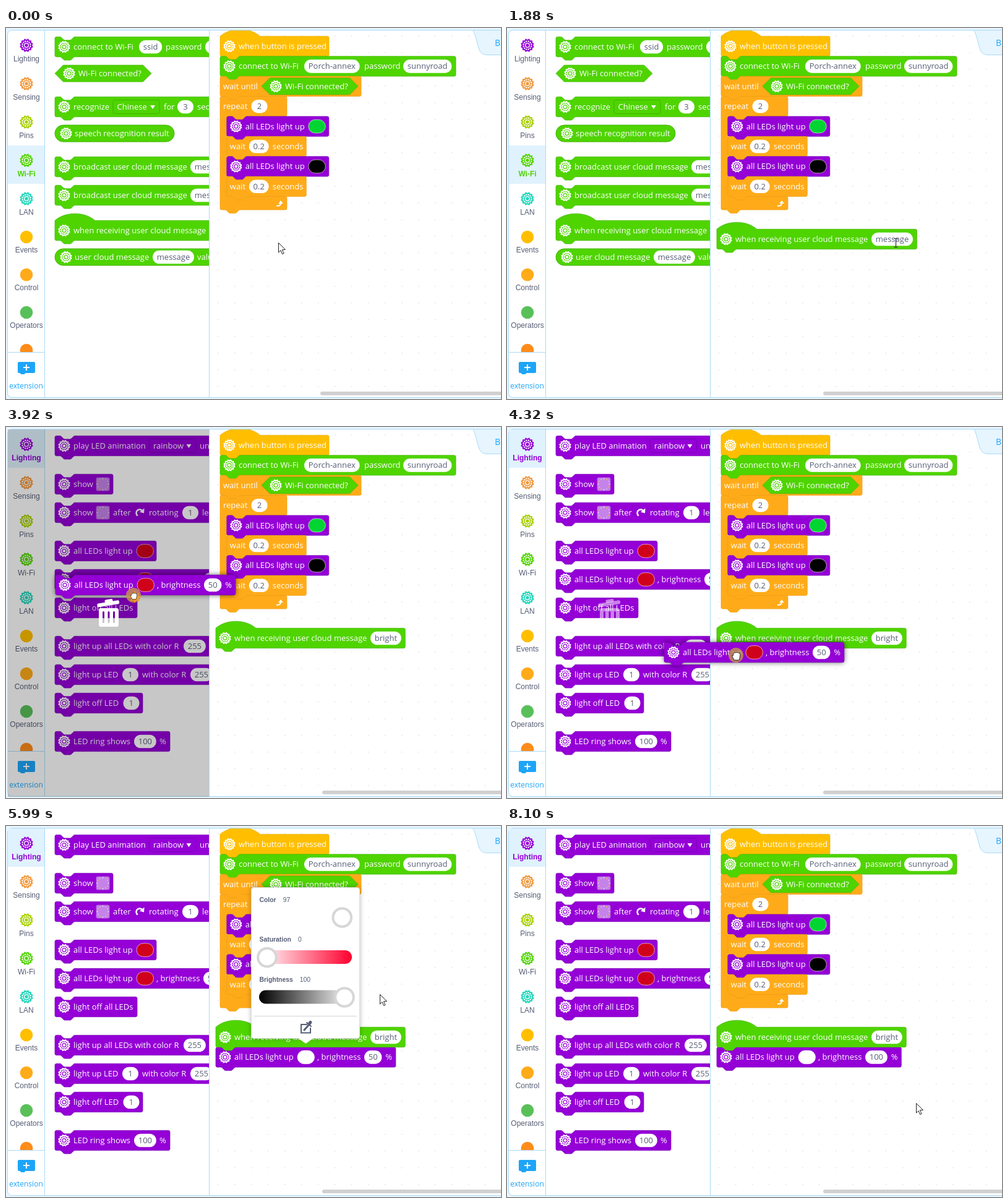
These frames come from a looping animation (800 by 600 pixels, 8.38 s). An HTML page with a canvas:

```html
<!DOCTYPE html>
<html lang="en">
<head>
<meta charset="utf-8">
<title>Block editor</title>
<style>
html, body { margin: 0; width: 100%; height: 100%; overflow: hidden; background: #e9f5fd; }
canvas { display: block; width: 800px; height: 600px; }
</style>
</head>
<body>
<canvas id="stage" width="800" height="600"></canvas>
<script>
const ctx = document.getElementById('stage').getContext('2d');
const LOOP = 8380, UNIT = 0.675, TAU = Math.PI * 2;
const BLOCK_FONT = '13px "Open Sans", "Noto Sans", sans-serif';
const SIDE_FONT = '12px "Liberation Sans", Arial, sans-serif';
const INK = '#575e75', RED = '#d0021b', LINE = '#a9dbf8', BLUE = '#1ea5f8';
const GREEN = ['#4fd400', '#41b300'], PURPLE = ['#9400d6', '#7a00b5'];
const ORANGE = ['#ffab19', '#ec9c13'], YELLOW = ['#ffbf00', '#e6ac00'];

// Timing: runs of evenly spaced picture changes [start, end, count]
const RUNS = [[80, 470, 5], [640, 1230, 7], [1500, 2260, 9], [2340, 2620, 4], [2810, 2810, 1],
  [3080, 3830, 9], [3920, 3920, 1], [4200, 4320, 2], [4390, 4680, 5], [4870, 5440, 7],
  [5630, 5990, 5], [6260, 6540, 4], [6790, 7550, 10], [7740, 8100, 5]];
const POINTER = [[0, 440, 347], [470, 205, 330], [560, 205, 330], [1230, 465, 344], [1410, 465, 344],
  [1880, 628, 347], [2500, 628, 347], [2620, 658, 415], [2809, 658, 415], [2810, 477, 432],
  [2990, 477, 432], [3830, 205, 263], [3920, 206, 272], [4120, 206, 272], [4320, 370, 369],
  [4390, 420, 374], [4680, 466, 380], [4780, 466, 380], [5250, 484, 368], [5629, 484, 368],
  [5630, 528, 277], [5900, 546, 277], [5990, 604, 272], [6170, 604, 272], [6540, 590, 324],
  [6700, 590, 324], [7100, 590, 368], [7300, 590, 372], [7550, 590, 416], [7650, 590, 416],
  [8100, 661, 448]];
const HAT_DRAG = [[560, 79, 327.5], [1230, 339, 341.5]];
const LED_DRAG = [[3830, 79, 246.5], [3920, 80, 255.5], [4120, 80, 255.5], [4320, 254, 364.5],
  [4390, 302, 369], [4680, 342, 376]];

function clock(t) {
  let last = 0;
  for (const [a, b, n] of RUNS) {
    if (t < a) break;
    const gap = n > 1 ? (b - a) / (n - 1) : 1;
    last = a + gap * Math.min(n - 1, Math.floor((t - a) / gap + 1e-6));
  }
  return last;
}

function at(keys, t) {
  const i = keys.findIndex(k => k[0] > t);
  if (i === 0) return keys[0].slice(1);
  if (i < 0) return keys[keys.length - 1].slice(1);
  const [t0, x0, y0] = keys[i - 1], [t1, x1, y1] = keys[i];
  const p = (t - t0) / (t1 - t0);
  return [x0 + (x1 - x0) * p, y0 + (y1 - y0) * p];
}

// Basic drawing
function text(s, x, y, color = '#fff', font = BLOCK_FONT, align = 'left') {
  ctx.font = font;
  ctx.textAlign = align;
  ctx.fillStyle = color;
  ctx.fillText(s, x, y);
}

function round(x, y, w, h, r, fill, stroke) {
  ctx.beginPath();
  ctx.roundRect(x, y, w, h, r);
  if (fill) { ctx.fillStyle = fill; ctx.fill(); }
  if (stroke) { ctx.strokeStyle = stroke; ctx.lineWidth = 1; ctx.stroke(); }
}

function dot(x, y, r, fill) {
  ctx.beginPath();
  ctx.arc(x, y, r, 0, TAU);
  ctx.fillStyle = fill;
  ctx.fill();
}

function line(color, width, ...pts) {
  ctx.beginPath();
  pts.forEach(([x, y]) => ctx.lineTo(x, y));
  ctx.strokeStyle = color;
  ctx.lineWidth = width;
  ctx.stroke();
}

function poly(fill, ...pts) {
  ctx.beginPath();
  pts.forEach(([x, y]) => ctx.lineTo(x, y));
  ctx.closePath();
  ctx.fillStyle = fill;
  ctx.fill();
}

function clipped(x, y, w, h, draw) {
  ctx.save();
  ctx.beginPath();
  ctx.rect(x, y, w, h);
  ctx.clip();
  draw();
  ctx.restore();
}

function placed(x, y, draw) {
  ctx.save();
  ctx.translate(x, y);
  draw();
  ctx.restore();
}

function ringIcon(x, y, r, fore, back) {
  dot(x, y, r * 0.93, fore);
  for (let i = 0; i < 12; i++) {
    const a = (i + 0.5) * TAU / 12, c = Math.cos(a), s = Math.sin(a);
    dot(x + c * r * 0.92, y + s * r * 0.92, r * 0.13, fore);
    dot(x + c * r * 0.64, y + s * r * 0.64, r * 0.115, back);
  }
  ctx.beginPath();
  ctx.arc(x, y, r * 0.32, 0, TAU);
  ctx.strokeStyle = back;
  ctx.lineWidth = r * 0.13;
  ctx.stroke();
}

// Block outlines, in units of 1 / UNIT pixels
const NOTCH = 'c 2 0 3 1 4 2 l 4 4 c 1 1 2 2 4 2 h 12 c 2 0 3 -1 4 -2 l 4 -4 c 1 -1 2 -2 4 -2';
const BUMP = 'c -2 0 -3 1 -4 2 l -4 4 c -1 1 -2 2 -4 2 h -12 c -2 0 -3 -1 -4 -2 l -4 -4 c -1 -1 -2 -2 -4 -2';
const TOP = `M 0 4 A 4 4 0 0 1 4 0 h 8 ${NOTCH}`;
const HAT = 'M 0 0 c 25 -22 71 -22 96 0';
const END = `H 48 ${BUMP} H 4 a 4 4 0 0 1 -4 -4 z`;
const side = (w, h) => `H ${w - 4} a 4 4 0 0 1 4 4 v ${h - 8} a 4 4 0 0 1 -4 4`;
const stackPath = (w, hat) => (hat ? HAT : TOP) + side(w, 48) + END;
const loopPath = (w, inner) => `${TOP} ${side(w, 48)} H 64 ${BUMP} H 20 a 4 4 0 0 0 -4 4
  v ${inner - 8} a 4 4 0 0 0 4 4 h 8 ${NOTCH} ${side(w, 32)} ${END}`;

function outline(x, y, d, [fill, edge], lifted) {
  const path = new Path2D(d);
  placed(x, y, () => {
    ctx.scale(UNIT, UNIT);
    ctx.save();
    if (lifted) { ctx.shadowColor = 'rgba(0,0,0,.6)'; ctx.shadowBlur = 8; }
    ctx.fillStyle = fill;
    ctx.fill(path);
    ctx.restore();
    ctx.strokeStyle = edge;
    ctx.lineWidth = 1;
    ctx.stroke(path);
  });
}

function pillWidth(s) {
  ctx.font = BLOCK_FONT;
  return Math.max(26, ctx.measureText(s).width + 13.5);
}

// Parts that may follow plain labels: [dx, value, kind, extra]
const PARTS = {
  field(x, y, s) {
    const w = pillWidth(s);
    round(x, y - 10.8, w, 21.6, 10.8, '#fff');
    text(s, x + w / 2, y + 4.5, INK, BLOCK_FONT, 'center');
  },
  menu(x, y, s, hue, w) {
    round(x, y - 11, w, 22, 3, hue[0], hue[1]);
    text(s, x + 6.5, y + 4.5);
    const m = x + w - 11;
    poly('#fff', [m - 4, y - 2.5], [m + 4, y - 2.5], [m, y + 3.5]);
  },
  color(x, y, c) {
    round(x, y - 10.8, 27.5, 21.6, 10.8, c, 'rgba(255,255,255,.6)');
  },
  matrix(x, y) {
    round(x, y - 10.5, 21, 21, 2, '#c583ea', '#b06bd8');
    for (let i = 0; i < 12; i++) {
      const a = i * TAU / 12;
      dot(x + 10.5 + 9 * Math.cos(a), y + 9 * Math.sin(a), 1,
        ['#eedcfa', '#f2b04a', '#dcb8f2'][i % 3]);
    }
  },
  turn(x, y) {
    ctx.beginPath();
    ctx.arc(x, y + 0.5, 5.5, 2.2, 5.5);
    ctx.strokeStyle = '#fff';
    ctx.lineWidth = 2.6;
    ctx.stroke();
    poly('#fff', [x + 7.5, y - 7], [x + 7, y + 1], [x, y - 1]);
  }
};

function parts(x, y, list, hue) {
  for (const [dx, value, kind, extra] of list) {
    if (kind) PARTS[kind](x + dx, y, value, hue, extra);
    else text(value, x + dx, y + 4.5);
  }
}

function stack(x, y, w, hue, list, { hat = false, lifted = false } = {}) {
  outline(x, y - 16.2, stackPath(w / UNIT, hat), hue, lifted);
  if (hue !== ORANGE) ringIcon(x + 15, y, 9.3, '#fff', hue[0]);
  parts(x, y, list, hue);
}

function hexagon(x, y) {
  outline(x, y - 13.5, 'M 20 0 H 211 l 20 20 l -20 20 H 20 l -20 -20 z', GREEN);
  ringIcon(x + 23, y, 9.3, '#fff', GREEN[0]);
  text('Wi-Fi connected?', x + 38, y + 4.5);
}

function reporter(x, y, w, list) {
  round(x, y - 13.5, w, 27, 13.5, GREEN[0], GREEN[1]);
  ringIcon(x + 18, y, 9.3, '#fff', GREEN[0]);
  parts(x, y, list, GREEN);
}

// Palettes
const BROADCAST = [[30, 'broadcast user cloud message'], [219, 'message', 'field']];
const LIGHT_UP = [[30, 'all LEDs light up'], [132, RED, 'color']];

function wifiPalette() {
  const x = 79;
  stack(x, 30.5, 320, GREEN, [[30, 'connect to Wi-Fi'], [136, 'ssid', 'field'],
    [179, 'password'], [243, 'password', 'field']]);
  hexagon(x, 73.5);
  stack(x, 127.5, 320, GREEN, [[30, 'recognize'], [94, 'Chinese', 'menu', 75], [176, 'for'],
    [198, '3', 'field'], [230, 'seconds']]);
  reporter(x, 170.5, 193, [[32, 'speech recognition result']]);
  stack(x, 224.5, 300, GREEN, BROADCAST);
  stack(x, 270.5, 300, GREEN, BROADCAST);
  stack(x, 327.5, 323, GREEN, [[30, 'when receiving user cloud message'],
    [250, 'message', 'field']], { hat: true });
  reporter(x, 370.5, 280, [[32, 'user cloud message'], [158, 'message', 'field'], [230, 'value']]);
}

function lightPalette() {
  const x = 79, add = (y, w, ...list) => stack(x, y, w, PURPLE, list);
  add(30.5, 320, [30, 'play LED animation'], [152.5, 'rainbow', 'menu', 75], [234, 'until done']);
  add(92.5, 94, [30, 'show'], [67, '', 'matrix']);
  add(138.5, 320, [30, 'show'], [67, '', 'matrix'], [94, 'after'], [137, '', 'turn'],
    [152, 'rotating'], [206, '1', 'field'], [238, 'led(s)']);
  add(200.5, 164, ...LIGHT_UP);
  add(246.5, 292, ...LIGHT_UP, [164, ', brightness'], [240, '50', 'field']);
  add(292.5, 133, [30, 'light off all LEDs']);
  add(354.5, 320, [30, 'light up all LEDs with color R'], [208, '255', 'field']);
  add(400.5, 320, [30, 'light up LED'], [109, '1', 'field'], [141, 'with color R'],
    [219, '255', 'field']);
  add(446.5, 142, [30, 'light off LED'], [110.5, '1', 'field']);
  add(508.5, 186, [30, 'LED ring shows'], [128, '100', 'field'], [169, '%']);
}

const CATEGORIES = [['Lighting', '#9400d6'], ['Sensing', '#f2973a'], ['Pins', '#a8d000'],
  ['Wi-Fi', '#4fd400'], ['LAN', '#1fd6ba'], ['Events', '#ffbf00'], ['Control', '#ffab19'],
  ['Operators', '#59c059'], ['Variables', '#ff8c1a']];

function sidebar(active) {
  clipped(3, 4, 59, 520, () => {
    ctx.fillStyle = '#e0f2fe';
    ctx.fillRect(3, 4 + active * 62, 59, 62);
    CATEGORIES.forEach(([name, color], i) => {
      const y = i < 6 ? 28 + i * 62 : 338 + (i - 5) * 61, on = i === active;
      if (i < 5) ringIcon(33, y, 10.3, color, '#fff');
      else dot(33, y, 10.3, color);
      text(name, 33, y + (i < 5 ? 25.5 : 25), on ? color : INK, (on ? 'bold ' : '') + SIDE_FONT, 'center');
    });
  });
  line(LINE, 1, [3, 524.5], [62, 524.5]);
  round(19, 540, 28, 18, 2, BLUE);
  round(23, 556, 8, 4, 2, BLUE);
  line('#fff', 2, [33, 544], [33, 554]);
  line('#fff', 2, [28, 549], [38, 549]);
  text('extension', 32.5, 583, BLUE, '12px "Open Sans", sans-serif', 'center');
}

// Workspace
function hatBlock(x, y, value, lifted) {
  stack(x, y, 256.5 + pillWidth(value), GREEN, [[30, 'when receiving user cloud message'],
    [250, value, 'field']], { hat: true, lifted });
}

function ledBlock(x, y, color, level, lifted) {
  const w = pillWidth(level);
  stack(x, y, 262.5 + w, PURPLE, [[30, 'all LEDs light up'], [132, color, 'color'],
    [164, ', brightness'], [240, level, 'field'], [246 + w, '%']], { lifted });
}

function program() {
  const x = 346, inner = 356.8;
  stack(x, 29.5, 176, YELLOW, [[30, 'when button is pressed']], { hat: true });
  stack(x, 61.9, 381, GREEN, [[30, 'connect to Wi-Fi'], [136, 'Porch-annex', 'field'],
    [233, 'password'], [296, 'sunnyroad', 'field']]);
  stack(x, 94.3, 228, ORANGE, [[5, 'wait until']]);
  hexagon(413, 94.3);
  outline(x, 110.5, loopPath(108 / UNIT, 192), ORANGE);
  parts(x, 126.7, [[5, 'repeat'], [50.5, '2', 'field']], ORANGE);
  ['#00d532', '#000'].forEach((color, i) => {
    const y = 159.1 + i * 64.8;
    stack(inner, y, 165, PURPLE, [[30, 'all LEDs light up'], [132, color, 'color']]);
    stack(inner, y + 32.4, 128.5, ORANGE, [[5, 'wait'], [36, '0.2', 'field'], [74, 'seconds']]);
  });
  ctx.beginPath();
  ctx.moveTo(437, 287.5);
  ctx.quadraticCurveTo(444, 288.5, 444, 283);
  ctx.strokeStyle = '#fff';
  ctx.lineWidth = 2;
  ctx.stroke();
  poly('#fff', [440, 284], [444, 279], [448, 284]);
}

function frame() {
  ctx.fillStyle = '#e9f5fd';
  ctx.fillRect(0, 0, 800, 600);
  round(2.5, 3.5, 820, 594, 7, '#fff', LINE);
  for (let x = 342; x < 800; x += 27)
    for (let y = 12; y < 597; y += 27) {
      ctx.fillStyle = '#ddd';
      ctx.fillRect(x, y, 1.4, 1.4);
    }
  const tab = new Path2D('M 754.5 3.5 C 760 14 761 24 764 33 Q 767 43.5 777 43.5 H 810 V 3.5 Z');
  ctx.fillStyle = '#e6f5fe';
  ctx.fill(tab);
  ctx.strokeStyle = LINE;
  ctx.lineWidth = 1;
  ctx.stroke(tab);
  text('Blocks', 790, 28.5, BLUE, '14px "Open Sans", sans-serif');
}

// Colour picker
function hsv(h, s, v) {
  const f = n => {
    const k = (n + h * 0.06) % 6;
    return Math.round(2.55 * v * (1 - s / 100 * Math.max(0, Math.min(k, 4 - k, 1))));
  };
  return `rgb(${f(5)},${f(3)},${f(1)})`;
}

function slider(label, value, y, colorAt) {
  text(label, 409.5, y - 25, INK, 'bold 10.4px "Liberation Sans", Arial, sans-serif');
  const w = ctx.measureText(label).width;
  text(value, 409.5 + w + 11, y - 25, INK, '10.4px "Liberation Sans", Arial, sans-serif');
  const g = ctx.createLinearGradient(409, 0, 559, 0);
  for (let i = 0; i <= 20; i++) g.addColorStop(i / 20, colorAt(i * 5));
  round(409, y - 11, 150, 22, 11, g);
  const x = 422 + value * 1.25;
  dot(x, y + 0.5, 16.8, '#d6d6d6');
  dot(x, y + 0.5, 12.8, '#fff');
}

function picker(alpha, bri) {
  const hue = 97, sat = 0;
  ctx.save();
  ctx.globalAlpha = alpha;
  ctx.shadowColor = 'rgba(0,0,0,.3)';
  ctx.shadowBlur = 9;
  round(396.5, 99.5, 175, 244, 4, '#fff');
  ctx.shadowColor = 'transparent';
  round(396.5, 99.5, 175, 244, 4, null, '#ddd');
  poly('#fff', [472, 343], [497, 343], [484.5, 352]);
  slider('Color', hue, 147.5, n => hsv(n, sat, bri));
  slider('Saturation', sat, 212, n => hsv(hue, n, bri));
  slider('Brightness', bri, 276.5, n => hsv(hue, sat, n));
  line('#d4d4d4', 1, [401, 307.5], [567, 307.5]);
  ctx.lineCap = 'round';
  line(INK, 2, [486, 321], [477, 321], [477, 334.5], [492, 334.5], [492, 327]);
  line(INK, 3, [482, 330], [489, 322]);
  line(INK, 5, [490, 320], [492, 317.5]);
  line(INK, 2, [486, 318], [493, 324]);
  ctx.restore();
}

// Trash can and pointers
function trash(alpha) {
  if (alpha <= 0) return;
  placed(165.5, 300, () => {
    ctx.globalAlpha = alpha;
    ctx.fillStyle = '#fff';
    ctx.beginPath();
    ctx.roundRect(-15.5, -7, 32, 30, 3);
    for (const x of [-9.5, -1, 7.5]) ctx.roundRect(x, -2, 3, 19, 1.5);
    ctx.fill('evenodd');
    ctx.rotate(-0.16);
    round(-16, -17, 36, 6, 2, '#fff');
    round(-3, -21, 13, 5, 2, '#fff');
  });
}

const ARROW = new Path2D('M .5 .5 V 16 L 4 12.6 L 6.6 18.6 L 9 17.5 L 6.4 11.7 L 11.4 11.3 Z');
const HAND = new Path2D(`M -4 7 L -7 1 Q -8 -1 -5.5 -.5 L -5 -4 Q -4 -6 -2.5 -4.5 Q -1 -7 .5 -5
  Q 2.5 -6.5 3.5 -4.3 Q 6 -5 6 -2 L 5 4 L 4 7 Z`);

function shape(path) {
  ctx.fillStyle = '#fff';
  ctx.fill(path);
  ctx.strokeStyle = '#222';
  ctx.lineWidth = 1;
  ctx.stroke(path);
}

function pointer(x, y, kind, burst) {
  placed(x, y, () => {
    if (kind === 'arrow') return shape(ARROW);
    if (kind === 'beam') {
      line('#333', 1.2, [0.5, -6], [0.5, 7]);
      for (const e of [-6.5, 7.5]) line('#333', 1, [-2.5, e], [3.5, e]);
      return;
    }
    if (kind === 'grab') {
      dot(0, 0, 12, 'rgba(196,152,72,.8)');
      if (burst) {
        const star = Array.from({ length: 16 }, (_, i) => {
          const r = i % 2 ? 5.5 : 10, a = i * TAU / 16;
          return [2 + r * Math.cos(a), 3 + r * Math.sin(a)];
        });
        poly('#ff9a1a', ...star);
      }
    }
    ctx.translate(1, 1);
    if (burst) ctx.scale(0.8, 0.8);
    shape(HAND);
  });
}

function within(c, ...spans) {
  return spans.some(([a, b]) => c >= a && c < b);
}

function typed(c, before, after, start, gap) {
  return c < start ? before : after.slice(0, 1 + Math.floor((c - start) / gap));
}

function draw(t) {
  const c = clock(t), [px, py] = at(POINTER, c);
  const lighting = c >= 2810, hatDrag = within(c, [640, 1500]), ledDrag = within(c, [3920, 4870]);
  const dragging = hatDrag || ledDrag;

  frame();
  sidebar(lighting ? 0 : 3);
  clipped(63, 4, 265, 593, lighting ? lightPalette : wifiPalette);
  line(LINE, 1, [62.5, 4], [62.5, 598]);
  line(LINE, 1, [328.5, 4], [328.5, 598]);
  if (dragging && px < 328) {
    ctx.fillStyle = 'rgba(0,0,0,.22)';
    ctx.fillRect(3, 4, 325, 594);
  }

  const message = typed(c, 'message', 'bright', 2050, 80);
  const level = typed(c, '50', '100', 7740, 80);
  const bri = Math.min(100, Math.round((px - 422) / 1.25));
  const color = c < 5630 ? RED : c < 5990 ? hsv(97, 0, bri) : '#fff';
  clipped(329, 4, 471, 593, () => {
    program();
    if (c >= 4870) ledBlock(339, 373.9, color, level);
    if (c >= 1500) hatBlock(339, 341.5, message);
  });
  const bar = c < 1230 ? 508 : 511;
  round(bar, 588, 300, 6, 3, '#d0d0d0');

  const fade = dragging ? Math.min(1, 1 - (px - 328) / 84) : 0;
  if (hatDrag) hatBlock(...at(HAT_DRAG, c), 'message', true);
  if (ledDrag) ledBlock(...at(LED_DRAG, c), RED, '50', true);
  trash(fade);
  if (within(c, [5630, 6440])) {
    const alpha = c < 6260 ? 1 : c < 6350 ? 0.66 : 0.33;
    picker(alpha, c < 5990 ? bri : 100);
  }

  const beam = within(c, [1780, 2560], [7030, 7380]);
  const hover = within(c, [470, 640], [3700, 3920]);
  pointer(px, py, dragging ? 'grab' : beam ? 'beam' : hover ? 'hand' : 'arrow',
    within(c, [640, 700], [3920, 4200]));
}

function tick() {
  draw(performance.now() % LOOP);
  requestAnimationFrame(tick);
}
tick();
</script>
</body>
</html>
```
